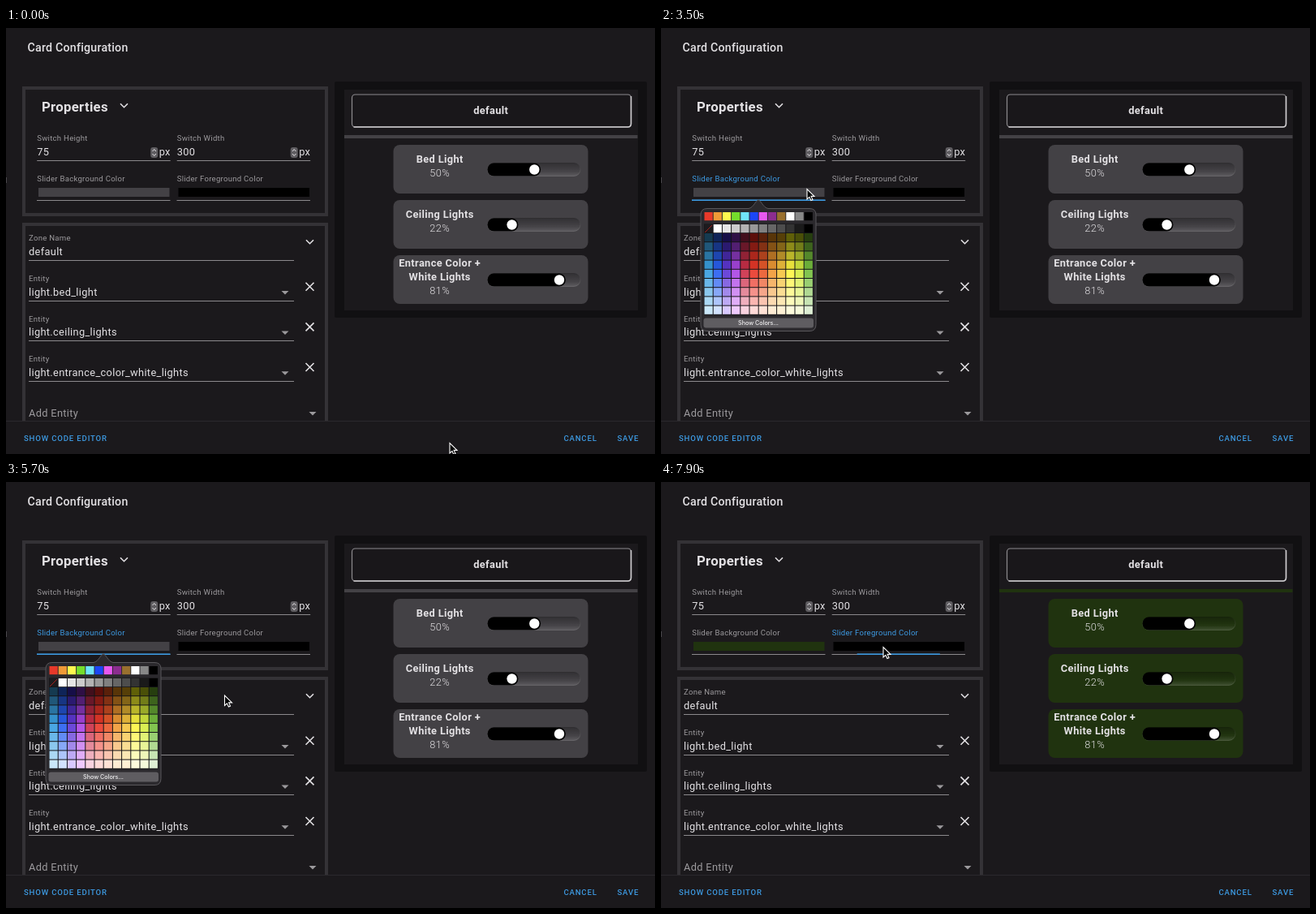
Animation of 800x525 px, one loop 8 s. Source, as an HTML page:

```html
<!DOCTYPE html>
<html lang="en">
<head>
<meta charset="utf-8">
<title>Card Configuration</title>
<style>
  html, body { margin: 0; width: 100%; height: 100%; overflow: hidden; background: #1b191c; }
  svg { display: block; --tint: #434145; }
  text { font: 12.8px Roboto, sans-serif; letter-spacing: .0265em; fill: #e3e1e4; white-space: pre; }
  .title { font-size: 14.2px; font-weight: 500; letter-spacing: .016em; }
  .heading { font-size: 16.8px; font-weight: 700; letter-spacing: .017em; }
  .label { font-size: 9.6px; fill: #9b999c; }
  .hint { fill: #9b999c; }
  .bold { font-weight: 700; letter-spacing: .028em; }
  .light { font-weight: 300; }
  .button { font-size: 9.6px; font-weight: 500; letter-spacing: .086em; fill: #3d9ae2; }
  .small { font: 500 7.2px Inter, sans-serif; letter-spacing: 0; fill: #f0eff1; }
  .mid { text-anchor: middle; }
  .label.on { fill: #3d9ae2; }
  .icon { fill: none; stroke: #e3e1e4; stroke-width: 1.6; }
</style>
</head>
<body>
<script>
const rect = (x, y, w, h, fill, extra = '') =>
  `<rect x="${x}" y="${y}" width="${w}" height="${h}" fill="${fill}" ${extra}/>`;
const tinted = (x, y, w, h, extra = '') => rect(x, y, w, h, '', `style="fill:var(--tint)" ${extra}`);
const text = (x, y, s, cls = '', id = '') => `<text x="${x}" y="${y}" class="${cls}" id="${id}">${s}</text>`;
const path = (d, extra) => `<path d="${d}" ${extra}/>`;
const line = (x, y, w) => rect(x, y, w, 1, '#8b898c');
const chevron = (x, y) => path(`M${x - 4.5} ${y - 2.3}l4.5 4.5 4.5-4.5`, 'class="icon"');
const caret = (x, y) => path(`M${x - 4.5} ${y - 2}h9l-4.5 4.5z`, 'fill="#9b999c"');

function numberField(x, label, value) {
  const s = x + 144.5;
  return text(x, 139, label, 'label') + text(x, 157, value) + text(x + 150.5, 157, 'px') +
    rect(s - 4.5, 147, 9, 13, '#5f5d61', 'rx="3"') +
    path(`M${s - 2.2} 152l2.2-2.5 2.2 2.5M${s - 2.2} 155l2.2 2.5 2.2-2.5`, 'fill="none" stroke="#e3e1e4"') +
    line(x, 163, 164.5);
}

function entity(i, name) {
  const y = i * 49.6;
  return text(28, Math.round(312 + y), 'Entity', 'label') + text(28, Math.floor(330 + y), name) +
    caret(344, 326 + y) + line(28, Math.floor(336 + y), 327) +
    path(`M369.500 ${313.8 + y}l10 10m0-10l-10 10`, 'class="icon"');
}

function card(i, lines, percent) {
  const y = 144 + i * 68, knob = 601.8 + .99 * percent, top = lines.length > 1 ? 13.5 : 22;
  return tinted(477.5, y, 240, 60, 'rx="8"') +
    lines.map((s, n) => text(534.7, y + top + n * 17, s, 'bold mid')).join('') +
    text(534.7, y + top + lines.length * 17, percent + '%', 'light mid') +
    rect(593.5, y + 22.5, 114.5, 16, 'url(#groove)', 'rx="8" stroke="url(#edge)"') +
    rect(593.5, y + 22.5, knob - 585.7, 16, '#000', 'rx="8"') +
    `<circle cx="${knob}" cy="${y + 30.5}" r="6.2" fill="#fff"/>`;
}

// Popover colours: each grid column runs dark -> vivid -> pale.
const dark = '153a50 0f2458 160e48 2e0f45 420f1c 5c0f0a 5a200a 583508 563f08 606008 4a5008 263e0f'.split(' ');
const vivid = '3a9fe0 2a5ff0 5f38d4 ab48e4 cc3048 e8392a ea5a2c f09a37 f5c440 fef544 d6ee42 76bf40'.split(' ');
const pale = 'cbe8fa d2e2fe d8c9fe efcafe f9d3e0 ffdad8 ffe2d6 feecd4 fef1d5 fdfbdd f6fadb deeed4'.split(' ');
const basics = 'e8392a f09a37 fff94f 75dd2c 70e4fa 1b46f5 e758f0 8b2d8f 99702f ffffff 888888 000000'.split(' ');
const PITCH = 11.2, LEFT = 53, GRID = 252.5, PEAK = 3.5;
const rgb = hex => [0, 2, 4].map(k => parseInt(hex.substr(k, 2), 16));
const mix = (a, b, k) => `rgb(${rgb(a).map((v, n) => Math.round(v + (rgb(b)[n] - v) * k))})`;
const swatch = (col, y, fill) => rect(LEFT + .5 + col * PITCH, y, 10.2, 10.2, fill);

function palette() {
  let s = path('M57 222.500H108C114 221.500 117 212 120 212S126 221.500 132 222.500H183Q191 222.500 191 230V365.500Q191 373.500 183 373.500H57Q49 373.500 49 365.500V230Q49 222.500 57 222.500Z',
    'fill="#2b292d" stroke="#59575b"');
  s += rect(LEFT, 241.5, 134.5, 112, '#151417');
  for (let c = 0; c < 12; c++) {
    s += swatch(c, 227, '#' + basics[c]);
    s += swatch(c, 242, c ? mix('ffffff', '000000', (c - 1) / 10) : '#1d1b1e');
    for (let r = 0; r < 9; r++) {
      const fill = r < PEAK ? mix(dark[c], vivid[c], r / PEAK) : mix(vivid[c], pale[c], (r - PEAK) / (8 - PEAK));
      s += swatch(c, GRID + .5 + r * PITCH, fill);
    }
  }
  s += path('M54 252l9-9', 'stroke="#a3201c"');
  s += rect(52.5, 357.5, 135.5, 12, '#5f5d61', 'rx="3"') + text(120, 366.3, 'Show Colors...', 'small mid');
  return s + rect(0, 0, 12, 12, 'none', 'id="hover" stroke="#fff" stroke-width="2"');
}

document.body.innerHTML = `<svg id="stage" width="800" height="525" viewBox="0 0 800 525">
  <defs>
    <linearGradient id="groove" x1="0" y1="0" x2="0" y2="1">
      <stop stop-color="#000" stop-opacity=".25"/><stop offset=".5" stop-color="#000" stop-opacity=".04"/>
      <stop offset=".6" stop-color="#fff" stop-opacity="0"/><stop offset="1" stop-color="#fff" stop-opacity=".14"/>
    </linearGradient>
    <linearGradient id="edge" x1="0" y1="0" x2="0" y2="1">
      <stop stop-color="#000" stop-opacity=".2"/><stop offset="1" stop-color="#fff" stop-opacity=".12"/>
    </linearGradient>
  </defs>` +
  rect(0, 0, 800, 525, '#1b191c') + rect(0, 184, 1, 7, '#49474b') +
  text(26.5, 29, 'Card Configuration', 'title') +
  rect(22, 74, 373, 156, 'none', 'stroke="#343236" stroke-width="4"') +
  rect(22, 242, 373, 300, 'none', 'stroke="#343236" stroke-width="4"') +
  text(44, 103, 'Properties', 'heading') + chevron(145.5, 95.5) +
  numberField(38.2, 'Switch Height', 75) + numberField(210.7, 'Switch Width', 300) +
  text(38.2, 189, 'Slider Background Color', 'label', 'backLabel') +
  text(210.7, 189, 'Slider Foreground Color', 'label', 'foreLabel') +
  tinted(40, 197, 161.5, 11) + rect(212.5, 197, 161.5, 11, '#000') +
  line(38, 212, 164.5) + line(210.5, 212, 164.5) +
  rect(0, 211.4, 0, 1.6, '#3d9ae2', 'id="backLine"') + rect(0, 211.4, 0, 1.6, '#3d9ae2', 'id="foreLine"') +
  text(28, 262, 'Zone Name', 'label') + text(28, 280, 'default') + chevron(374.5, 263.5) + line(28, 286, 327) +
  ['light.bed_light', 'light.ceiling_lights', 'light.entrance_color_white_lights'].map((n, i) => entity(i, n)).join('') +
  text(28, 479, 'Add Entity', 'hint') + caret(378, 475) +
  rect(0, 484, 800, 41, '#1b191c') + rect(0, 484, 800, 1, '#2b292d') +
  text(22, 509, 'SHOW CODE EDITOR', 'button') + text(687.4, 509, 'CANCEL', 'button') + text(753.5, 509, 'SAVE', 'button') +
  rect(405, 66, 385, 291, '#111012', 'rx="2"') + rect(417, 76, 362, 272, '#1b191c') +
  rect(426.5, 82, 344, 40, '#19171a', 'rx="4" stroke="#8c8a8e" stroke-width="1.2"') +
  path('M428.500 122H766.500Q770.500 122 770.500 118V84', 'fill="none" stroke="#cfcdd0" stroke-width="1.6"') +
  text(597.7, 105.5, 'default', 'bold mid') +
  tinted(417, 132, 361.5, 4) +
  card(0, ['Bed Light'], 50) + card(1, ['Ceiling Lights'], 22) + card(2, ['Entrance Color +', 'White Lights'], 81) +
  `<g id="popover">${palette()}</g>` +
  path('M0 0V12.400L2.900 9.800 4.900 14 7 13.100 5.100 8.900H9Z', 'id="cursor" fill="#000" stroke="#fff" stroke-width="1.1"') +
  '</svg>';

const $ = id => document.getElementById(id);
const LOOP = 8000, FOCUS = 1900, OPEN = 2300, PICK = 6500, REFOCUS = 7800;
// Pointer stops: time, x, y.
const stops = [[100, 547, 511.5], [1500, 180, 198.5], [3700, 180, 198.5], [4700, 71, 256], [5000, 71, 256],
  [5600, 269.5, 263], [5800, 269.5, 263], [6400, 184.5, 257], [6900, 184.5, 257], [7600, 274, 203.5]];
const clamp = v => Math.min(1, Math.max(0, v));

function pointer(t) {
  let i = 0;
  while (i < stops.length - 2 && t > stops[i + 1][0]) i++;
  const [a, b] = [stops[i], stops[i + 1]];
  const k = clamp((t - a[0]) / (b[0] - a[0])), e = k * k * (3 - 2 * k);
  return [a[1] + (b[1] - a[1]) * e, a[2] + (b[2] - a[2]) * e];
}

function focusField(name, middle, on, grow) {
  const w = on ? 164.5 * (1 - (1 - grow) ** 2) : 0;
  $(name + 'Label').classList.toggle('on', on);
  $(name + 'Line').setAttribute('x', middle - w / 2);
  $(name + 'Line').setAttribute('width', w);
}

function draw(now) {
  const t = Math.floor(now % LOOP / 100) * 100;
  const [x, y] = pointer(t);
  $('cursor').setAttribute('transform', `translate(${x} ${y})`);
  $('stage').style.setProperty('--tint', t < PICK ? '#434145' : '#20330f');
  focusField('back', 120.25, t >= FOCUS && t < REFOCUS, clamp((t - FOCUS + 100) / 300));
  focusField('fore', 292.75, t >= REFOCUS, clamp((t - REFOCUS) / 260));

  // The popover dims slightly on the pick, then closes.
  $('popover').style.opacity = t < OPEN ? 0 : t <= PICK ? 1 : clamp(.87 - (t - PICK - 200) / 200);
  const col = Math.floor((x - LEFT) / PITCH), row = Math.floor((y - GRID) / PITCH);
  const inside = col >= 0 && col < 12 && row >= 0 && row < 9;
  $('hover').style.display = inside ? '' : 'none';
  $('hover').setAttribute('x', LEFT - .4 + col * PITCH);
  $('hover').setAttribute('y', GRID - .4 + row * PITCH);
  requestAnimationFrame(draw);
}
requestAnimationFrame(draw);
</script>
</body>
</html>
```
